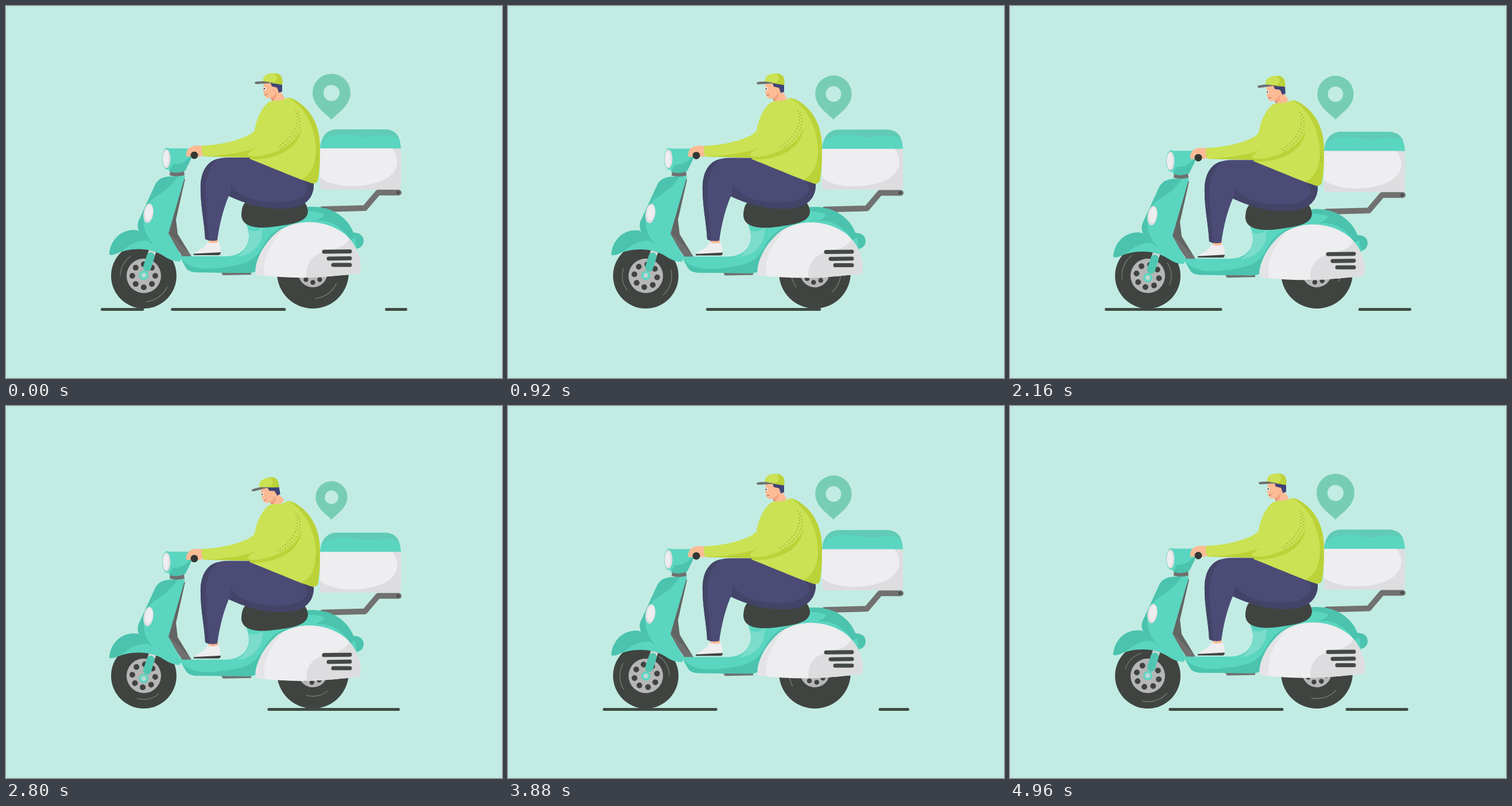
An HTML page for the animation above (5000 ms loop, 864 by 648 pixels).

```html
<!DOCTYPE html>
<html lang="en">
<head>
<meta charset="utf-8">
<title>Scooter delivery</title>
<style>
  html, body { margin: 0; width: 100%; height: 100%; overflow: hidden; background: #c2ece3; }
  svg { display: block; width: 100vw; height: 100vh; }
  .teal { fill: #5ad5c0; }
  .deep { fill: #4bc3ae; }
  .white { fill: #eeedef; }
  .shade { fill: #dddddf; }
  .dark { fill: #404440; }
  .grey { fill: #6f706f; }
  .lime { fill: #cae253; }
  .moss { fill: #bbd238; }
  .navy { fill: #4c4b76; }
  .night { fill: #434468; }
  .skin { fill: #fabb95; }
  .line { fill: none; stroke-linecap: round; stroke-linejoin: round; }
</style>
</head>
<body>
<svg viewBox="0 0 864 648">
  <defs>
    <g id="hub">
      <circle class="hubDisc" r="30" fill="#b5b6b5"/>
      <path id="holes" class="line" stroke="#404440" stroke-width="10"/>
    </g>
    <path id="treads" class="line" stroke="#7d817e" stroke-width="1.2" d="M-41 0A41 41 0 0 1-23-34M41 19A45 45 0 0 1 4 45"/>
    <clipPath id="boxClip"><path d="M547 248H688V314Q688 320 682 320H553Q547 320 547 314Z"/></clipPath>
    <clipPath id="fenderClip"><path id="fender" d="M436 468C430 455 445 415 475 392C505 371 555 370 590 397C608 412 622 440 617 463Q616 467 610 467C570 470 545 474 500 473Q450 471 436 468Z"/></clipPath>
  </defs>

  <path id="pin" fill="#77cdb3" fill-rule="evenodd" d="M567 198C556 186 534 174 534 151A33 33 0 0 1 600 151C600 174 578 186 567 198ZM567 137.500A14 14 0 0 0 567 165.500A14 14 0 0 0 567 137.500Z"/>

  <g class="line" stroke="#3f4b42" stroke-width="5">
    <path id="longDash" pathLength="1" d="M167.500 528.500H696.500" stroke-dasharray=".369 .631"/>
    <path id="shortDash" pathLength="1" d="M167.500 528.500H696.500" stroke-dasharray=".197 .803"/>
  </g>

  <g transform="translate(240 470)">
    <circle class="dark" r="57"/>
    <g class="spin"><use href="#treads"/><use href="#hub"/></g>
  </g>
  <g transform="translate(534.500 464.500)">
    <circle class="dark" r="62.500"/>
    <g class="spin"><use href="#treads"/><use href="#hub" transform="scale(.85)"/></g>
  </g>

  <g id="scooter">
    <!-- fork -->
    <path class="line" stroke="#d5d8d7" stroke-width="13" style="stroke-linecap:butt" d="M257 422L252 436"/>
    <path class="line" stroke="#4fc7b2" stroke-width="14" d="M252 436L246 455"/>
    <circle class="teal" cx="240" cy="469" r="8"/>
    <circle cx="240" cy="469" r="4.500" fill="#b9d8d2"/>

    <!-- box and bracket -->
    <path class="teal" d="M547 249C548 229 558 215 576 215H662Q687 217 688 249Z"/>
    <path fill="#60cbb6" d="M549 238C553 225 561 215 576 215H662Q679 216 685 231C660 219 645 230 620 228C594 221 564 222 549 238Z"/>
    <g clip-path="url(#boxClip)">
      <path class="shade" d="M547 248H688V320H547Z"/>
      <path class="white" d="M547 248H673C688 268 684 290 658 303C625 318 568 318 547 298Z"/>
    </g>
    <path class="line" stroke="#707170" stroke-width="10" d="M551 354L625 352L648 325H684"/>
    <g fill="#4d504e"><circle cx="553" cy="354" r="3"/><circle cx="683" cy="325" r="3"/></g>

    <!-- chassis -->
    <path class="grey" d="M373 461H427V468L378 469Z"/>
    <path class="deep" d="M603 394L614 396Q623 400 623 409Q623 418 614 422H603Z"/>
    <path class="teal" d="M300 433L320 436H382C410 436 424 419 423 399Q422 385 415 374L526 350C562 347 598 365 608 403L612 425L470 462L435 462Q430 465 420 465L330 464Q317 463 313 455Z"/>
    <path class="deep" d="M526 350C562 347 598 365 608 403L600 408C586 382 558 370 538 375C560 364 562 360 526 357Z"/>
    <path class="deep" d="M306 442Q325 461 365 457C410 452 430 449 446 421C456 399 474 385 500 378L480 452L435 462Q430 465 420 465L330 464Q317 463 313 455Z"/>
    <path fill="#7bdccb" d="M421 390Q440 397 448 383L445 405Q434 434 402 437Q425 421 423 399Z"/>

    <!-- rear fender -->
    <use href="#fender" class="white"/>
    <g clip-path="url(#fenderClip)">
      <path class="shade" d="M524 476C519 443 541 428 570 424Q597 418 600 398L625 420V476Z"/>
      <path fill="#e4e4e6" d="M430 470C430 440 455 400 485 385C455 420 445 445 452 474Z"/>
    </g>
    <path class="line" stroke="#444946" stroke-width="7" d="M554 428L599 427.500M562 440L599 439.500M570 451H599"/>

    <!-- seat -->
    <path class="dark" d="M417 342H520Q526 350 526 358C525 376 500 380 470 384C437 389 409 385 410 362Q411 347 417 342Z"/>

    <!-- front shield -->
    <path class="grey" d="M309 302L312 301L296 372L299 397L323 436H307L281 398Z"/>
    <path fill="#535755" d="M309 302L312 301L296 372L299 397L318 429L284 396Z" opacity=".45"/>
    <path class="teal" d="M180 433C181 407 203 386 230 391Q265 417 305 436L303 445Q290 446 274 435C250 420 217 421 193 431Q186 435 180 433Z"/>
    <path class="deep" d="M180 433C181 407 203 386 230 391L254 411C240 405 221 411 204 425Q190 435 180 433Z"/>
    <path class="teal" d="M312 296L283 297Q268 298 261 309L231 374Q227 386 234 395Q258 424 303 444L306 437L283 396Z"/>
    <path class="deep" d="M283 297Q268 298 261 309L231 374Q227 386 234 395Q244 407 258 417Q237 393 240 372C241 338 262 333 270 326Q287 315 300 296Z"/>
    <ellipse class="shade" cx="248" cy="361" rx="8.500" ry="17" transform="rotate(8 248 361)"/>
    <ellipse class="white" cx="249" cy="360" rx="6.500" ry="14" transform="rotate(8 249 360)"/>

    <!-- headlight -->
    <path class="grey" d="M286 287H310L311 295Q298 298 285 295Z"/>
    <path class="teal" d="M282 248H329Q322 259 322 267L312 287Q298 293 284 288Z"/>
    <path class="deep" d="M284 288Q298 293 312 287L322 267L324 258Q311 277 291 276Z"/>
    <ellipse class="teal" cx="281" cy="266" rx="9" ry="19"/>
    <ellipse class="shade" cx="279.500" cy="266" rx="7" ry="16.500"/>
    <ellipse class="white" cx="278.500" cy="266" rx="5" ry="14"/>

    <!-- rider -->
    <path class="skin" d="M353 404H369V414H353Z"/>
    <path class="white" d="M328 432C334 424 345 424 351 411Q361 415 371 411Q374 420 374 432Z"/>
    <path class="dark" d="M327 431.500L374 429Q374 434 370 434H327Z"/>
    <path class="navy" d="M339 320C338 288 350 264 387 264H425C460 277 500 300 536 309C537 330 525 349 495 352C455 356 420 346 388 331C378 355 372 380 368 408Q358 411 347 406C346 380 339 350 339 320Z"/>
    <path class="night" d="M388 331Q393 323 391 311C412 343 466 344 494 340C530 332 529 315 516 303L536 309C537 330 525 349 495 352C455 356 420 346 388 331Z"/>
    <path class="night" d="M339 320C338 291 349 270 370 266C343 287 347 325 349 350L354 409L347 406C346 380 339 350 339 320Z"/>
    <path class="skin" d="M314 262C312 247 325 240 343 244V261L333 263Z"/>
    <circle cx="328" cy="260" r="6.500" fill="#333734"/>

    <g id="head">
      <path class="skin" d="M449 134L448 147L450 156Q453 162 460 160L464 159L465 169Q476 169 486 161L478 148L479 134Z"/>
      <path fill="#f3a47f" d="M460 160Q468 157 471 150Q473 161 464 165Z"/>
      <path fill="#3f4476" d="M461 134L481 135V149L475 151Q474 143 468 141L463 140Z"/>
      <ellipse class="skin" cx="470" cy="146" rx="3" ry="4.500"/>
      <ellipse cx="450.500" cy="144" rx="2" ry="2.800" fill="#fff"/>
      <circle cx="450" cy="144" r="1.300" fill="#333"/>
      <path class="line" stroke="#a75b48" d="M451 155L455 154M463 162L465 165"/>
      <path class="lime" d="M448 133C446 121 455 117 466 117C478 117 483 124 481 137L462 134Z"/>
      <path class="moss" d="M468 117C479 118 483 124 481 137L462 134C474 132 475 124 468 117Z"/>
      <path class="grey" d="M433 133Q434 131 449 131L466 134L437 136Q433 136 433 133Z"/>
    </g>

    <path class="lime" d="M458 167Q467 164 475 165Q486 163 490 160Q498 160 504 164C532 180 548 210 547 250Q547 285 543 305Q540 309 534 309C500 298 460 280 424 266L427 262L344 262Q339 253 342 243C385 242 425 228 433 217C436 198 444 178 458 167Z"/>
    <path class="moss" d="M490 160Q498 160 504 164C532 180 548 210 547 250Q547 285 543 305Q540 309 534 309L514 302C552 287 546 210 510 174Q499 162 490 160Z"/>
    <path class="moss" d="M344 262Q400 260 436 247C405 264 430 264 450 260C482 252 508 236 515 210C513 246 475 268 427 267L424 264Z"/>
    <path class="line" stroke="#7f922b" stroke-width="1.600" stroke-dasharray="0 5.500" d="M505 182C515 207 496 233 470 248M509 185C520 210 501 235 476 249M541 260L544 270"/>
  </g>
</svg>

<script>
  const LOOP = 5000, STEP = 40;
  const $ = id => document.getElementById(id);
  const spinners = document.querySelectorAll('.spin');

  $('holes').setAttribute('d', Array.from({ length: 8 }, (_, i) => {
    const a = i * Math.PI / 4;
    return `M${20 * Math.cos(a)} ${20 * Math.sin(a)}h.01`;
  }).join(''));

  const transform = (el, value) => el.setAttribute('transform', value);
  const slide = (id, start, period, t) =>
    $(id).setAttribute('stroke-dashoffset', -((start + t / period) % 1));

  function draw(t) {
    const lift = Math.abs(Math.sin(17 * Math.PI * t / LOOP)) ** 2.8;
    transform($('scooter'), `translate(0 ${5.9 * lift})`);
    transform($('head'), `rotate(${-11 * lift ** 3} 470 165)`);

    // The pin shrinks and grows, then rests until its next cycle.
    const beat = Math.min(t % 1250, 1050) / 1050;
    const size = 1 - .1325 * (1 - Math.cos(2 * Math.PI * beat));
    transform($('pin'), `translate(567 198) scale(${size}) translate(-567 -198)`);

    slide('longDash', .231, 829.5, t);
    slide('shortDash', .936, 1736, t);
    spinners.forEach(el => transform(el, `rotate(${-6 * 360 * t / LOOP})`));
  }

  const begin = performance.now();
  function tick() {
    const t = (performance.now() - begin) % LOOP;
    draw(Math.floor(t / STEP) * STEP);
    requestAnimationFrame(tick);
  }
  tick();
</script>
</body>
</html>
```
